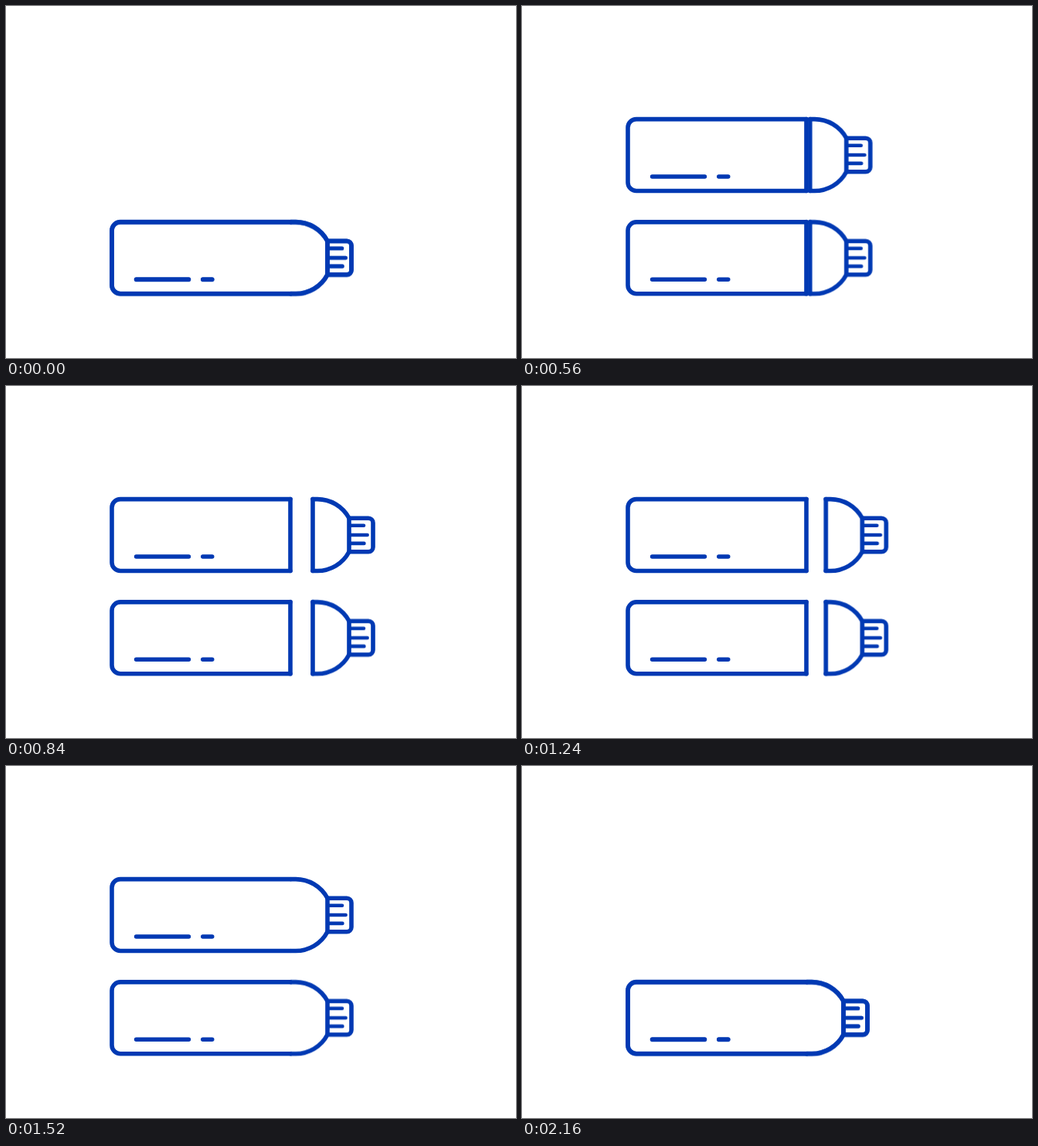
Recreate the animation shown at these times as an HTML page. Size 660x456 px, loop 3000 ms.

```html
<!DOCTYPE html>
<html lang="en">
<head>
<meta charset="utf-8">
<title>Bottles</title>
<style>
  html, body { margin: 0; width: 100%; height: 100%; overflow: hidden; background: #fff; }
  svg { display: block; width: 660px; height: 456px; }
  svg { fill: none; stroke: #0039b3; stroke-width: 5.6; stroke-linecap: round; stroke-linejoin: round; }
  .thin { stroke-width: 4.6; }

  .upper, .cap, .edge { animation: 3s step-end infinite; }
  .upper { animation-name: lift; }
  .cap { animation-name: pull; }
  .edge { animation-name: cut; }

  /* Linear moves of 200 ms and 300 ms, shown at 25 pictures a second */
  @keyframes lift {
    0%     { transform: translateY(133.3px); }
    1.33%  { transform: translateY(114.8px); animation-timing-function: steps(4, end); }
    6.66%  { transform: translateY(8.1px); }
    7.99%  { transform: translateY(0); }
    65.33% { transform: translateY(18.5px); animation-timing-function: steps(4, end); }
    70.66% { transform: translateY(125.2px); }
    71.99%, 100% { transform: translateY(133.3px); }
  }
  @keyframes pull {
    0%     { transform: translateX(0); }
    18.66% { transform: translateX(3.73px); animation-timing-function: steps(6, end); }
    26.66% { transform: translateX(26.13px); }
    27.99% { transform: translateX(28px); }
    41.33% { transform: translateX(24.27px); animation-timing-function: steps(6, end); }
    49.33% { transform: translateX(1.87px); }
    50.66%, 100% { transform: translateX(0); }
  }
  @keyframes cut {
    0%, 50.66%, 100% { opacity: 0; }
    18.66% { opacity: 1; }
  }
</style>
</head>
<body>
<svg viewBox="0 0 660 456">
  <defs>
    <g id="body">
      <path d="M368 146.6H148a11 11 0 0 0-11 11V228.5a11 11 0 0 0 11 11H368"/>
      <path d="M168.5 221H236.5M254.7 221H266.8" stroke-width="5.4"/>
    </g>
    <g id="cap">
      <path d="M369 146.6H374A46.5 46.5 0 0 1 416 171.3V214.7A46.5 46.5 0 0 1 374 239.5H369"/>
      <path d="M416 171.3H441a6 6 0 0 1 6 6V208.7a6 6 0 0 1-6 6H416"/>
      <path class="thin" d="M418 180.8H435M418 193H439.6M418 203.9H435.4"/>
    </g>
    <path id="edge" d="M0 146.6V239.5"/>
  </defs>

  <g transform="translate(0 133.3)">
    <use href="#body"/>
    <use class="edge" href="#edge" x="368"/>
    <g class="cap">
      <use href="#cap"/>
      <use class="edge" href="#edge" x="369"/>
    </g>
  </g>

  <g class="upper">
    <use href="#body"/>
    <use class="edge" href="#edge" x="368"/>
    <g class="cap">
      <use href="#cap"/>
      <use class="edge" href="#edge" x="369"/>
    </g>
  </g>
</svg>
</body>
</html>
```
